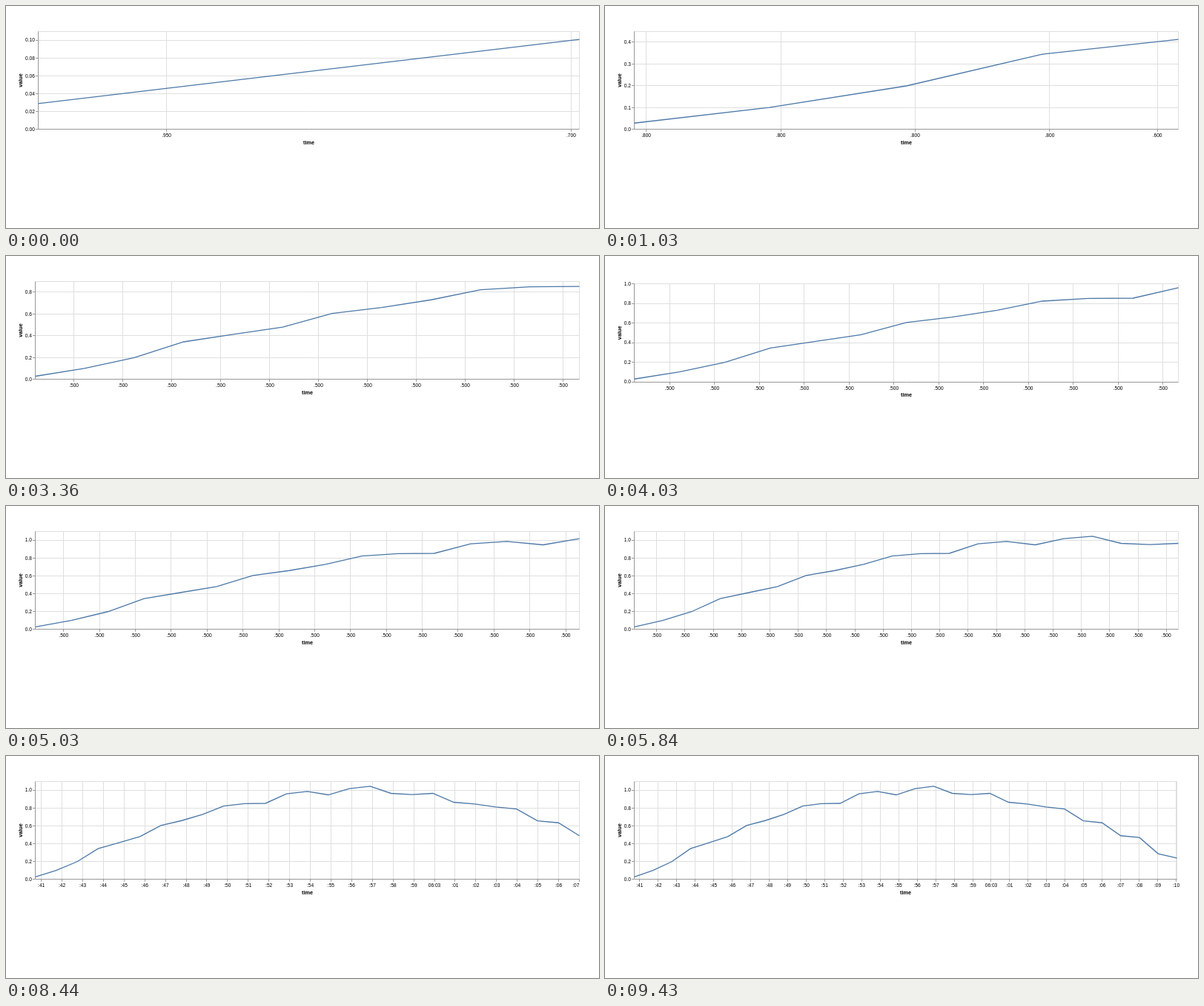
Recreate the animation shown at these times as an HTML page with a canvas. Size 800 by 300 pixels, loop 9800 ms.

```html
<!DOCTYPE html>
<html lang="en">
<head>
<meta charset="utf-8">
<title>Live line chart</title>
<style>
  html, body { margin: 0; width: 100%; height: 100%; overflow: hidden; background: #fff; }
  canvas { display: block; }
</style>
</head>
<body>
<canvas id="chart" width="800" height="300"></canvas>
<script>
const ctx = document.getElementById('chart').getContext('2d');
const LOOP = 9800, SCALE = 0.6635, HEIGHT = 132.6;
const FONT = '"Liberation Sans", Arial, sans-serif';
const GRID = '#dfdfdf', AXIS = '#989898';

const values = [0.029, 0.101, 0.1995, 0.345, 0.413, 0.48, 0.605, 0.66, 0.73, 0.823,
  0.85, 0.853, 0.96, 0.986, 0.948, 1.018, 1.044, 0.965, 0.952, 0.965,
  0.865, 0.845, 0.812, 0.79, 0.657, 0.635, 0.49, 0.47, 0.288, 0.24];
// When each point after the second one arrives, in ms.
const arrivals = [330, 670, 990, 1350, 1670, 2000, 2340, 2700, 3020, 3360, 3720, 4050, 4390, 4720,
  5050, 5390, 5640, 5830, 6130, 6440, 6780, 7110, 7450, 7800, 8130, 8470, 8800, 9130];

// Clock time of a sample in ms after 06:02:00.
const sampleTime = i => 40712 + 1011.2 * i - (i === 1 ? 8 : 0);
const snap = v => Math.floor(v) + 0.5;

// Round tick step: 1, 2 or 5 times a power of ten.
function tickStep(span, count) {
  const raw = span / count, power = 10 ** Math.floor(Math.log10(raw)), error = raw / power;
  return power * (error >= Math.sqrt(50) ? 10 : error >= Math.sqrt(10) ? 5 : error >= Math.sqrt(2) ? 2 : 1);
}

// Only the last tick of every second is kept.
function timeTicks(start, end) {
  const step = Math.min(1000, Math.round(tickStep(end - start, 28)));
  const second = t => Math.floor(t / 1000);
  const ticks = [];
  for (let t = Math.ceil(start / step) * step; t <= end; t += step) {
    if (t + step > end || second(t + step) !== second(t)) ticks.push(t);
  }
  return ticks;
}

function timeLabel(t) {
  if (t % 1000) return '.' + String(t % 1000).padStart(3, '0');
  const s = t / 1000 % 60;
  return s ? ':' + String(s).padStart(2, '0') : '06:03';
}

function line(x1, y1, x2, y2, color) {
  ctx.strokeStyle = color;
  ctx.lineWidth = 1;
  ctx.beginPath();
  ctx.moveTo(x1, y1);
  ctx.lineTo(x2, y2);
  ctx.stroke();
}

function text(str, x, y, align, bold) {
  ctx.font = bold ? `bold 7.3px ${FONT}` : `6.6px ${FONT}`;
  ctx.textAlign = align;
  ctx.fillText(str, x, y);
}

function draw(count) {
  const data = values.slice(0, count);
  const peak = Math.max(...data);
  const nice = tickStep(peak, 10);
  const yMax = Math.ceil(peak / nice) * nice;
  const yStep = tickStep(yMax, 5);
  const yCount = Math.floor(yMax / yStep + 1e-6);
  const labelOnTop = Math.abs(yMax - yCount * yStep) < 1e-6;
  const decimals = yStep < 0.099 ? 2 : 1;

  const start = sampleTime(0), end = sampleTime(count - 1);
  const ticks = timeTicks(start, end);
  const lastTick = ticks[ticks.length - 1];
  const left = decimals === 2 ? 43.4 : 39.6;
  let right = 773.5;
  const gap = (end - lastTick) / (end - start) * (right - left);
  const flush = gap < SCALE;
  if (!flush && gap < 2) right = 771.5;

  const top = 34.2 + (labelOnTop ? 3.3 : 0), bottom = top + HEIGHT;
  const x = t => left + (t - start) / (end - start) * (right - left);
  const y = v => bottom - v / yMax * HEIGHT;
  const x0 = snap(left), x1 = snap(right), y0 = snap(top), y1 = snap(bottom);
  const tickSize = 5 * SCALE;

  ctx.fillStyle = '#fff';
  ctx.fillRect(0, 0, 800, 300);
  ctx.fillStyle = '#000';
  ctx.strokeStyle = GRID;
  ctx.lineWidth = 1;
  ctx.strokeRect(x0, y0, x1 - x0, y1 - y0);

  for (const t of ticks) line(snap(x(t)), y0, snap(x(t)), y1, GRID);
  for (let i = 0; i <= yCount; i++) {
    const v = i * yStep, ty = snap(y(v));
    line(x0, ty, x1, ty, GRID);
    line(x0 - tickSize, ty, x0, ty, AXIS);
    text(v.toFixed(decimals), left - 4.6, y(v) + 2.2, 'right');
  }
  for (const t of ticks) {
    const tx = snap(x(t));
    line(tx, y1, tx, y1 + tickSize, AXIS);
    text(timeLabel(t), x(t), bottom + 10.4, flush && t === lastTick ? 'right' : 'center');
  }
  line(x0, y0, x0, y1, AXIS);
  line(x0, y1, x1, y1, AXIS);

  text('time', (left + right) / 2, bottom + 20, 'center', true);
  ctx.save();
  ctx.translate(21.8, (top + bottom) / 2);
  ctx.rotate(-Math.PI / 2);
  text('value', 0, 0, 'center', true);
  ctx.restore();

  ctx.strokeStyle = '#4c78a8';
  ctx.lineWidth = 2 * SCALE;
  ctx.beginPath();
  data.forEach((v, i) => ctx.lineTo(x(sampleTime(i)), y(v)));
  ctx.stroke();
}

function tick() {
  const now = performance.now() % LOOP;
  draw(2 + arrivals.filter(t => t <= now).length);
  requestAnimationFrame(tick);
}
tick();
</script>
</body>
</html>
```
